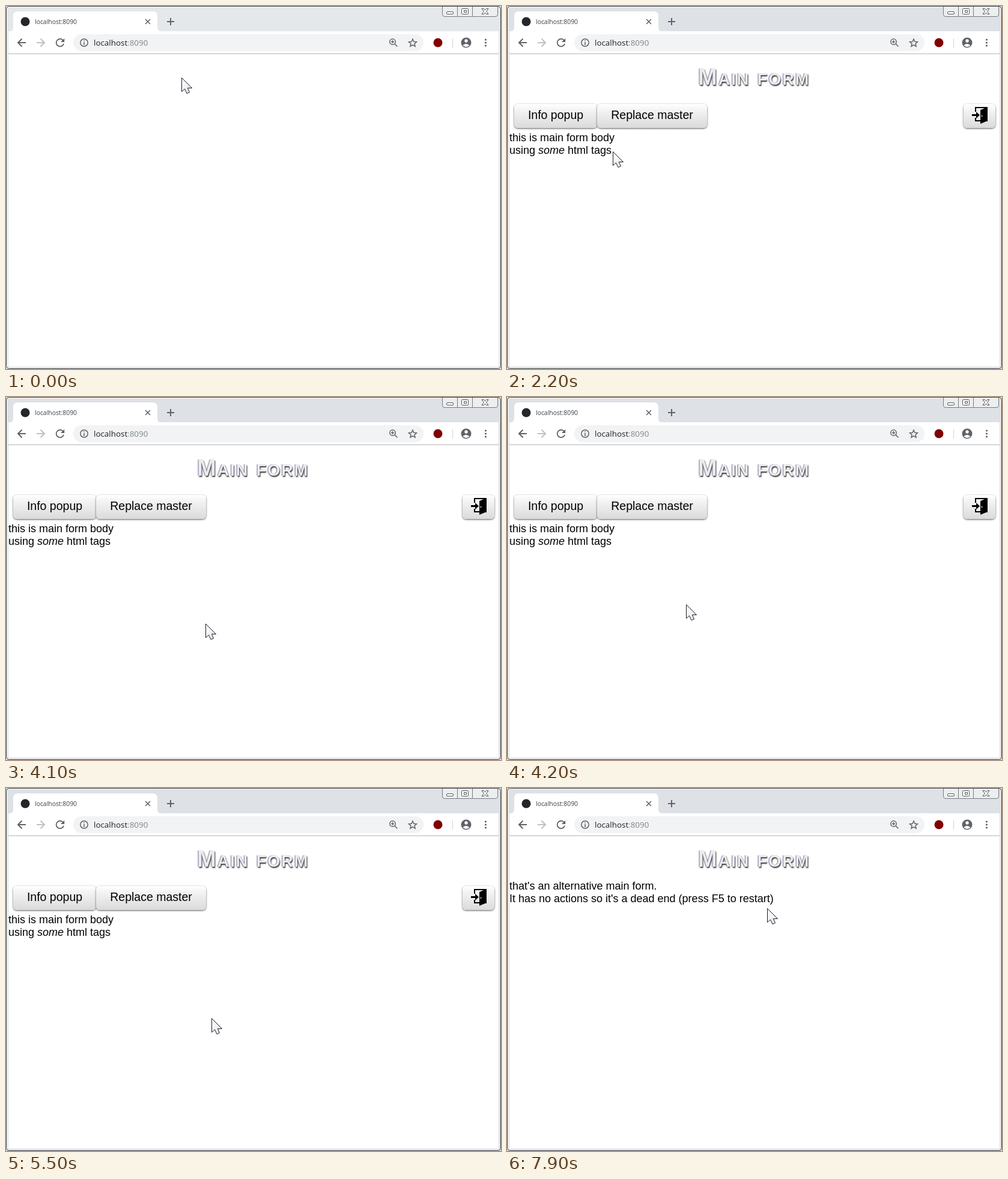
An HTML page that plays this animation: 824x604 px, repeating every 8 s.

```html
<!DOCTYPE html>
<html lang="en">
<head>
<meta charset="utf-8">
<title>Form demo</title>
<style>
  html, body { margin: 0; width: 100%; height: 100%; overflow: hidden; }
  body { position: relative; background: #fff; color: #000; font: 18px/21px "Liberation Sans", Arial, sans-serif; }
  body *:not(svg *, i) { position: absolute; box-sizing: border-box; white-space: nowrap; }
  svg { left: 0; top: 0; overflow: visible; }
  .ui { font-family: "Open Sans", sans-serif; }
  h1 { left: 318px; top: 97px; margin: 0; font: small-caps bold 38px/42px "Liberation Sans", Arial, sans-serif;
       letter-spacing: 2px; color: #ececec; text-shadow: 1px 2px 2px #333, -1px 0 1px #7c7cb4; }
  .button { top: 163px; height: 40px; border-radius: 6px; text-align: center; font-size: 19.5px; line-height: 37px;
            background: linear-gradient(#fff, #f4f4f4 25%, #dadada); box-shadow: 0 1px 3px #000a; }
  .button.hover { background: linear-gradient(#dcdcdc, #c8c8c8 30%, #999); }
  #info { left: 12px; width: 138px; }
  #replace { left: 150px; width: 183px; }
  #exit { left: 760px; width: 53px; }
  .body { left: 4px; }
  #shade { left: 4px; top: 80px; width: 816px; height: 520px; background: #0000001a; }
  #dialog { left: 300px; top: 258px; width: 224px; height: 164px; background: #fff;
            border: 2px solid #000; box-shadow: 0 0 40px #000a; }
  #caption { left: -1px; top: 0; width: 222px; height: 28px; padding-left: 2px; background: #99f;
             font: bold 24px/28px "Liberation Sans", Arial, sans-serif; color: #161620; text-shadow: 1px 1px 3px #0005; }
  #message { left: 29px; top: 57px; }
  #ok { left: 5px; top: 110px; width: 77px; height: 37px; }
</style>
</head>
<body>
<svg class="ui" width="824" height="604" fill="none" stroke="#5f6368" stroke-width="2">
  <g stroke="none">
    <path id="bar" d="M0 0H824V604H820V42H4V600H820V604H0Z"/>
    <path fill="#fff" d="M4 43Q12 43 12 35V17Q12 9 20 9H244Q252 9 252 17V35Q252 43 260 43H820V79H4Z"/>
    <path fill="#b4b6b8" d="M4 79H820V80H4Z"/>
    <circle cx="32" cy="26" r="7.5" fill="#24262a"/>
    <circle id="reloadHover" cx="90" cy="61" r="14" fill="#e8eaed"/>
    <rect x="112" y="47" width="583" height="28" rx="14" fill="#f1f3f4"/>
    <text x="48" y="30" font-size="10.4" fill="#3c4043">localhost:8090</text>
    <text x="146" y="66" font-size="13.4" fill="#202124">localhost<tspan fill="#80868b">:8090</tspan></text>
    <path fill="#5f6368" transform="translate(79.2 50.2) scale(.9)" d="M17.65 6.35A8 8 0 1 0 19.73 14H17.65A6 6 0 1 1 16.22 7.78L13 11H20V4Z"/>
    <circle cx="719" cy="61" r="7.5" fill="#800000"/>
    <circle cx="766" cy="61" r="8.5" fill="#5f6368"/>
    <circle cx="766" cy="58" r="2.7" fill="#fff"/>
    <path fill="#fff" d="M760.5 65.5Q766 60.500 771.500 65.500Q766 70.500 760.500 65.500Z"/>
    <g fill="#5f6368"><circle cx="798.5" cy="56" r="1.6"/><circle cx="798.5" cy="61" r="1.6"/><circle cx="798.5" cy="66" r="1.6"/></g>
  </g>
  <path d="M33 61H20M26.500 54.500L20 61L26.500 67.500"/>
  <path stroke="#bdc1c6" d="M51 61H64M57.500 54.500L64 61L57.500 67.500"/>
  <path stroke-width="1.6" d="M232 22L240 30M240 22L232 30"/>
  <path d="M268 26H280M274 20V32"/>
  <g stroke-width="1.5">
    <circle cx="130" cy="61" r="6.2"/><path d="M130 60V65M130 57V58.600"/>
    <circle cx="643.5" cy="59.5" r="4.7"/><path d="M647 63L651.500 67.500M641 59.500H646M643.500 57V62"/>
    <path d="M677 55L678.900 59.200L683.500 59.700L680 62.700L681 67.200L677 64.800L673 67.200L674 62.700L670.500 59.700L675.100 59.200Z"/>
  </g>
  <path stroke="#d0d3d6" stroke-width="1" d="M743.500 54V69"/>
  <g stroke="#777b80" stroke-width="1">
    <path fill="#eceef0" d="M726.500 0V14Q726.500 17.500 730 17.500H815Q818.500 17.500 818.500 14V0M751.500 0V17M776.500 0V17"/>
    <g fill="#fff" stroke="#555">
      <rect x="733.5" y="9.500" width="11" height="4" rx="1.500"/>
      <rect x="758.5" y="4.500" width="11" height="9" rx="1"/><rect x="762.5" y="7.500" width="4" height="3"/>
      <path d="M792 4.500H795.500L797.500 7L799.500 4.500H803L799.500 9L803 13.500H799.500L797.500 11L795.500 13.500H792L795.500 9Z"/>
    </g>
  </g>
  <path stroke="#fff" stroke-width="1" d="M1.500 603V7Q1.500 1.500 7 1.500H726" opacity=".8"/>
  <rect x=".5" y=".5" width="823" height="603" rx="5" stroke="#3a3c40" stroke-width="1"/>
</svg>

<h1 id="heading">Main form</h1>
<div id="main">
  <div class="button" id="info">Info popup</div>
  <div class="button" id="replace">Replace master</div>
  <div class="button" id="exit">
    <svg width="53" height="40">
      <path fill="none" stroke="#000" stroke-width="2" d="M20 13V6H39V28H20V23"/>
      <path d="M28 10L40 5V28L28 33ZM14 17H21V13L27 18.500L21 24V20H14Z"/>
      <circle cx="30.500" cy="20" r="1" fill="#fff"/>
    </svg>
  </div>
  <div class="body" style="top:209px">this is main form body<br>using <i>some</i> html tags</div>
</div>
<div class="body" id="alternative" style="top:153px">that's an alternative main form.<br>It has no actions so it's a dead end (press F5 to restart)</div>
<div id="popup">
  <div id="shade"></div>
  <div id="dialog">
    <div id="caption">Info form title</div>
    <div id="message">Some important info</div>
    <div class="button" id="ok">OK</div>
  </div>
</div>

<svg width="824" height="604">
  <defs><linearGradient id="sheen" x2="1" y2="1"><stop stop-color="#fff"/><stop offset="1" stop-color="#e4e4e8"/></linearGradient></defs>
  <g id="cursor" fill="url(#sheen)" stroke="#1c1c2a" stroke-linejoin="round">
    <path id="arrow" d="M.5 .5V23.500L5.500 19L9 26.500L13.500 24.500L10.300 17.500H17.500Z"/>
    <path id="hand" d="M-1.500 19V2Q.5 -1 2.500 2V12Q5 9.500 6.500 12.500Q9 10.500 10.500 13.500Q13.500 12 14.500 15.500V22L11.500 32.500H1L-7 20.500Q-6.500 15.500 -1.500 19ZM2.500 12V17M6.500 12.500V17M10.500 13.500V17"/>
  </g>
</svg>

<script>
const LOOP = 8000, STEP = 100;
const $ = id => document.getElementById(id);
const show = (id, on) => { $(id).style.display = on ? "" : "none"; };

// Pointer waypoints: time, x, y
const path = [
  [0, 292, 119], [500, 92, 59], [900, 92, 59], [1500, 180, 245], [2100, 180, 245],
  [2900, 83, 181], [3300, 83, 181], [3900, 350, 393], [4000, 350, 393], [4200, 298, 345],
  [4600, 110, 178], [4700, 110, 178], [4800, 142, 199], [5300, 345, 390], [5400, 345, 390],
  [6200, 260, 201], [6500, 248, 186], [7000, 248, 186], [7300, 160, 149], [7500, 113, 165], [7900, 433, 200]
];

const slope = (i, k) => path[i + 1] && path[i] ? (path[i + 1][k] - path[i][k]) / (path[i + 1][0] - path[i][0]) : 0;

function tangent(i, k) {
  const a = slope(i - 1, k), b = slope(i, k);
  return a * b > 0 ? 2 * a * b / (a + b) : 0;
}

// Monotone cubic interpolation of one coordinate
function coordinate(t, k) {
  const i = path.findLastIndex(p => p[0] <= t);
  if (i === path.length - 1) return path[i][k];
  const h = path[i + 1][0] - path[i][0], u = (t - path[i][0]) / h, s = u * u * (3 - 2 * u);
  return path[i][k] * (1 - s) + path[i + 1][k] * s
    + h * u * (1 - u) * ((1 - u) * tangent(i, k) - u * tangent(i + 1, k));
}

function draw(now) {
  const t = Math.floor(now % LOOP / STEP) * STEP;
  const x = Math.round(coordinate(t, 1)), y = Math.round(coordinate(t, 2));
  const between = (a, b) => t >= a && t < b;
  const popup = between(3100, 4000) || between(4700, 5500);
  const main = between(900, 6600);

  $("bar").setAttribute("fill", t < 700 ? "#e4e8eb" : "#dee1e6");
  show("reloadHover", Math.hypot(x - 90, y - 61) < 14);
  show("heading", t >= 900);
  show("main", main);
  show("alternative", t >= 6600);
  show("popup", popup);

  let pointing = false;
  for (const id of ["info", "replace", "exit", "ok"]) {
    const r = $(id).getBoundingClientRect();
    const over = main && popup === (id === "ok") && x >= r.left && x < r.right && y >= r.top && y < r.bottom;
    $(id).classList.toggle("hover", over);
    pointing ||= over;
  }
  show("arrow", !pointing);
  show("hand", pointing);
  $("cursor").setAttribute("transform", `translate(${x} ${y})`);
}

const start = performance.now();
(function tick() {
  draw(performance.now() - start);
  requestAnimationFrame(tick);
})();
</script>
</body>
</html>
```
